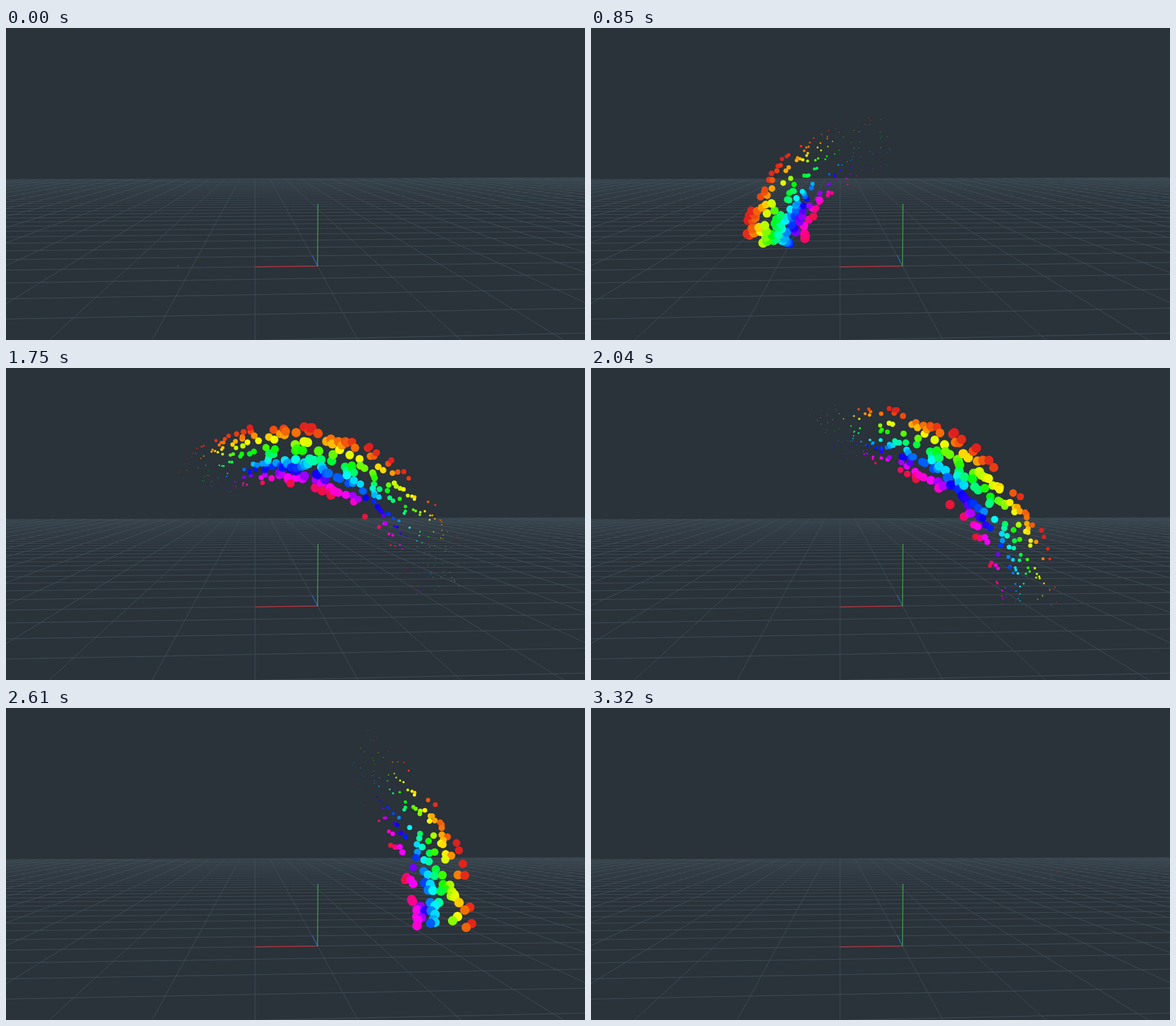
Write an HTML page with a canvas that moves like this. It is 901x486 px and loops after 3.37 s.

```html
<!DOCTYPE html>
<html lang="en">
<head>
<meta charset="utf-8">
<title>Rainbow particles</title>
<style>
  html, body { margin: 0; width: 100%; height: 100%; overflow: hidden; background: #2a323a; }
  canvas { display: block; }
</style>
</head>
<body>
<canvas id="stage" width="901" height="486"></canvas>
<script>
const W = 901, H = 486, LOOP = 3370, STEPS = 71;
const ctx = document.getElementById('stage').getContext('2d');

// Particles are born along an arc from left to right, then rise with constant acceleration.
const CX = 483, CY = 372, INNER = 147, OUTER = 244;
const COUNT = 430, SWEEP = 1836, LIFE = 1520, RISE = 9.7e-5, MAX_SIZE = 14.8;

let seed = 71;
function random() {
  seed = (seed * 1664525 + 1013904223) % 4294967296;
  return seed / 4294967296;
}

// Red on the outside, through the spectrum, to crimson on the inside.
function rainbow(depth) {
  const hue = 352 * Math.pow(depth, 1.25);
  const fromRed = Math.min(hue, 360 - hue);
  return `hsl(${hue}, ${Math.min(100, 76 + fromRed * 0.7)}%, 49.5%)`;
}

const particles = Array.from({ length: COUNT }, (_, i) => {
  const u = Math.pow((i + random()) / COUNT, 1.1);
  const depth = random();
  const r = OUTER + (INNER - OUTER) * depth;
  return {
    x: CX - r * Math.cos(Math.PI * u),
    y: CY - r * Math.sin(Math.PI * u),
    birth: SWEEP * u - 10,
    color: rainbow(depth)
  };
});

function line(c, x1, y1, x2, y2) {
  c.beginPath();
  c.moveTo(x1, y1);
  c.lineTo(x2, y2);
  c.stroke();
}

// Floor grid in two-point perspective with the three axes.
function makeFloor() {
  const canvas = document.createElement('canvas');
  canvas.width = W;
  canvas.height = H;
  const c = canvas.getContext('2d');
  const vx = 387.5, vy = 192, far = 13450, edge = 43;
  c.fillStyle = '#2a323a';
  c.fillRect(0, 0, W, H);
  c.lineWidth = 1;
  for (let k = -5; k <= 33; k++) {
    const u = 1 / (0.005556 + 0.00054 * k);
    const yAt = x => vy + u * (1 - (x - vx) / far);
    c.strokeStyle = `rgba(66, 80, 89, ${0.65 + 0.3 * Math.min(1, u / 200)})`;
    line(c, 0, yAt(0), W, yAt(W));
  }
  c.strokeStyle = 'rgba(66, 80, 89, 0.85)';
  for (let m = -40; m <= 40; m++) {
    const slope = m * 0.5442;
    const top = edge / (1 + slope * edge / far);
    line(c, vx + slope * top, vy + top, vx + slope * 320, vy + 320);
  }
  const axes = [
    ['#2f6ad8', 476.5, 354, 485, 371],
    ['#dc343e', 388, 372.2, 485, 370.8],
    ['#35d040', 485.4, 274, 484.8, 371]
  ];
  for (const [color, ...ends] of axes) {
    c.strokeStyle = color;
    line(c, ...ends);
  }
  return canvas;
}

const floor = makeFloor();

// Grows and shrinks once, peaking a little after half of the life.
function sizeAt(age) {
  const wave = Math.sin(Math.PI * Math.pow(age / LIFE, 1.2));
  return Math.max(1, MAX_SIZE * wave * wave);
}

function draw(time) {
  ctx.drawImage(floor, 0, 0);
  for (const p of particles) {
    const age = time - p.birth;
    if (age < 0 || age > LIFE) continue;
    ctx.fillStyle = p.color;
    ctx.beginPath();
    ctx.arc(p.x, p.y - RISE * age * age / 2, sizeAt(age) / 2, 0, Math.PI * 2);
    ctx.fill();
  }
}

const start = performance.now();
function tick() {
  const elapsed = (performance.now() - start) % LOOP;
  const step = LOOP / STEPS;
  draw(Math.min(STEPS - 1, Math.floor((elapsed + 12) / step)) * step);
  requestAnimationFrame(tick);
}
tick();
</script>
</body>
</html>
```
